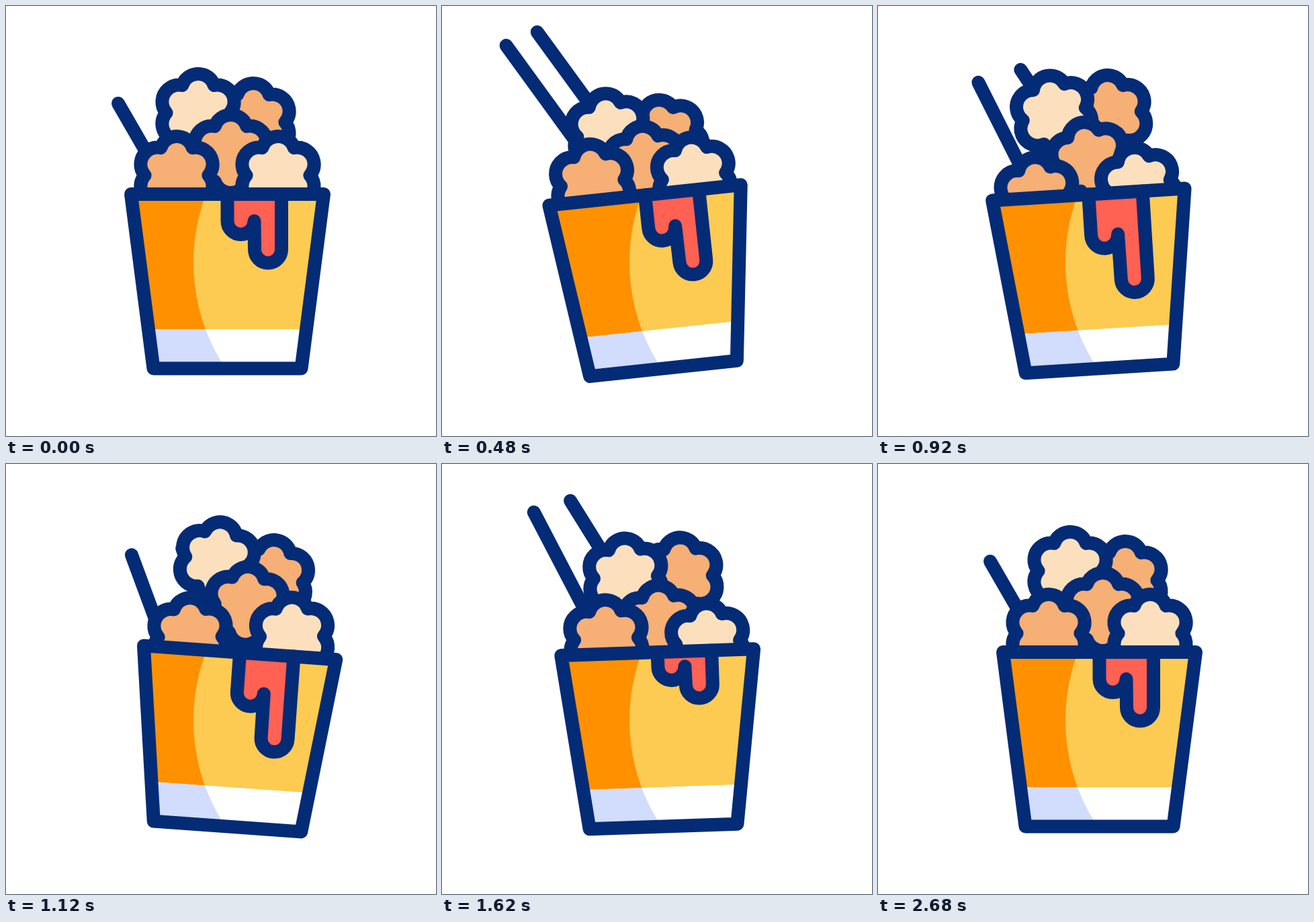
Recreate the animation shown at these times as an HTML page with a canvas. Size 640 by 640 pixels, loop 3.02 s.

```html
<!DOCTYPE html>
<html lang="en">
<head>
<meta charset="utf-8">
<title>Snack cup</title>
<style>
  html, body { margin: 0; width: 100%; height: 100%; overflow: hidden; background: #fff; }
  canvas { display: block; width: 100vw; height: 100vh; }
</style>
</head>
<body>
<canvas id="stage" width="640" height="640"></canvas>
<script>
const ctx = document.getElementById('stage').getContext('2d');
const LOOP = 3020, RAD = Math.PI / 180;
const PIVOT = { x: 329.5, y: 539.5 };
const NAVY = '#042b76', YELLOW = '#fdcb52', ORANGE = '#ff9100', LILAC = '#d2dcfc';
const RED = '#ff6152', PEACH = '#f6af74', CREAM = '#fce0be';

// How long each swing of a part takes, in ms.
const BEAT = [500, 500, 400, 260, 240];
const LIFT_BEAT = [640, 460, 490, 750];
const SWAY_BEAT = [260, 390, 500, 600];
const DRIP_BEAT = [1000, 700, 470, 510];

// From back to front; each ball starts a little after the one before.
const BALLS = [
  { x: 368, y: 173, color: PEACH },
  { x: 286, y: 159, color: CREAM },
  { x: 334.5, y: 220, color: PEACH },
  { x: 405, y: 252, color: CREAM },
  { x: 254, y: 252, color: PEACH }
];

const STICKS = [
  { x: 167, y: 145, slant: 0.18, loosen: 8 },
  { x: 241, y: 130, slant: 0.42, loosen: 0 }
];

const ease = s => s * s * (3 - 2 * s);

// Swings from 0 through each peak in turn, then back to rest.
function wave(t, beat, peaks) {
  let from = 0;
  if (t <= 0) return from;
  for (let i = 0; i < beat.length; i++) {
    const to = peaks[i] || 0;
    if (t < beat[i]) return from + (to - from) * ease(t / beat[i]);
    t -= beat[i];
    from = to;
  }
  return from;
}

function stroke() {
  ctx.strokeStyle = NAVY;
  ctx.lineWidth = 20;
  ctx.lineCap = ctx.lineJoin = 'round';
  ctx.stroke();
}

function tiltTo(angle) {
  ctx.setTransform(1, 0, 0, 1, 0, 0);
  ctx.translate(PIVOT.x, PIVOT.y);
  ctx.rotate(angle);
  ctx.translate(-PIVOT.x, -PIVOT.y);
}

function drawStick(stick, t) {
  const length = 230;
  const lift = wave(t, LIFT_BEAT, [-128, 2, -80]);
  const sway = wave(t - 470, SWAY_BEAT, [41, -9]);
  const lean = (30 - stick.loosen * wave(t - 470, SWAY_BEAT, [1, 0.7, 0.55])) * RAD;
  const x = stick.x + stick.slant * lift + sway;
  const y = stick.y + lift;
  ctx.beginPath();
  ctx.moveTo(x, y);
  ctx.lineTo(x + length * Math.sin(lean), y + length * Math.cos(lean));
  stroke();
}

function drawBall(ball, i, t) {
  const local = t - i * 100;
  const spin = (17 - 3 * i) * wave((local - 280) * 1.3, BEAT, [-1, 0.25, -0.25]);
  const lobe = 33, radius = 25, half = 71.2 * RAD;
  ctx.save();
  ctx.translate(ball.x, ball.y + wave(local, BEAT, [26, -13, 19, -6]));
  ctx.rotate(spin * RAD);
  ctx.beginPath();
  for (let k = 0; k < 6; k++) {
    const a = (k * 60 - 90) * RAD;
    ctx.arc(lobe * Math.cos(a), lobe * Math.sin(a), radius, a - half, a + half);
  }
  ctx.closePath();
  ctx.fillStyle = ball.color;
  ctx.fill();
  stroke();
  ctx.restore();
}

function cupPath() {
  ctx.beginPath();
  ctx.moveTo(186, 280);
  ctx.lineTo(473, 280);
  ctx.lineTo(439.5, 539.5);
  ctx.lineTo(219.5, 539.5);
  ctx.closePath();
}

function fillBands(upper, lower, width) {
  ctx.fillStyle = upper;
  ctx.fillRect(150, 270, width, 211);
  ctx.fillStyle = lower;
  ctx.fillRect(150, 481, width, 70);
}

function drawSauce(t) {
  const shortY = 320 + wave(t, DRIP_BEAT, [22, -19, 17]);
  const longY = 362.5 + wave(t, DRIP_BEAT, [48, -35, 12]);
  ctx.beginPath();
  ctx.moveTo(329.5, 280);
  ctx.arc(349.5, shortY, 20, Math.PI, 0, true);
  ctx.arc(390, longY, 20, Math.PI, 0, true);
  ctx.lineTo(410, 280);
  ctx.fillStyle = RED;
  ctx.fill();
  stroke();
}

function drawCup(t, angle) {
  ctx.save();
  cupPath();
  ctx.clip();
  fillBands(YELLOW, '#fff', 360);
  // The shadow edge stays still while the cup tilts.
  ctx.setTransform(1, 0, 0, 1, 0, 0);
  ctx.beginPath();
  ctx.rect(0, 0, 565, 640);
  ctx.arc(565, 381.5, 286, 0, Math.PI * 2);
  ctx.clip('evenodd');
  tiltTo(angle);
  fillBands(ORANGE, LILAC, 250);
  ctx.restore();

  drawSauce(t);
  cupPath();
  stroke();
}

function draw(t) {
  const angle = wave(t - 195, BEAT, [-10, 5, -2]) * RAD;
  ctx.setTransform(1, 0, 0, 1, 0, 0);
  ctx.fillStyle = '#fff';
  ctx.fillRect(0, 0, 640, 640);
  tiltTo(angle);
  STICKS.forEach(stick => drawStick(stick, t));
  BALLS.forEach((ball, i) => drawBall(ball, i, t));
  drawCup(t, angle);
}

const start = performance.now();
function tick() {
  draw((performance.now() - start) % LOOP);
  requestAnimationFrame(tick);
}
tick();
</script>
</body>
</html>
```
